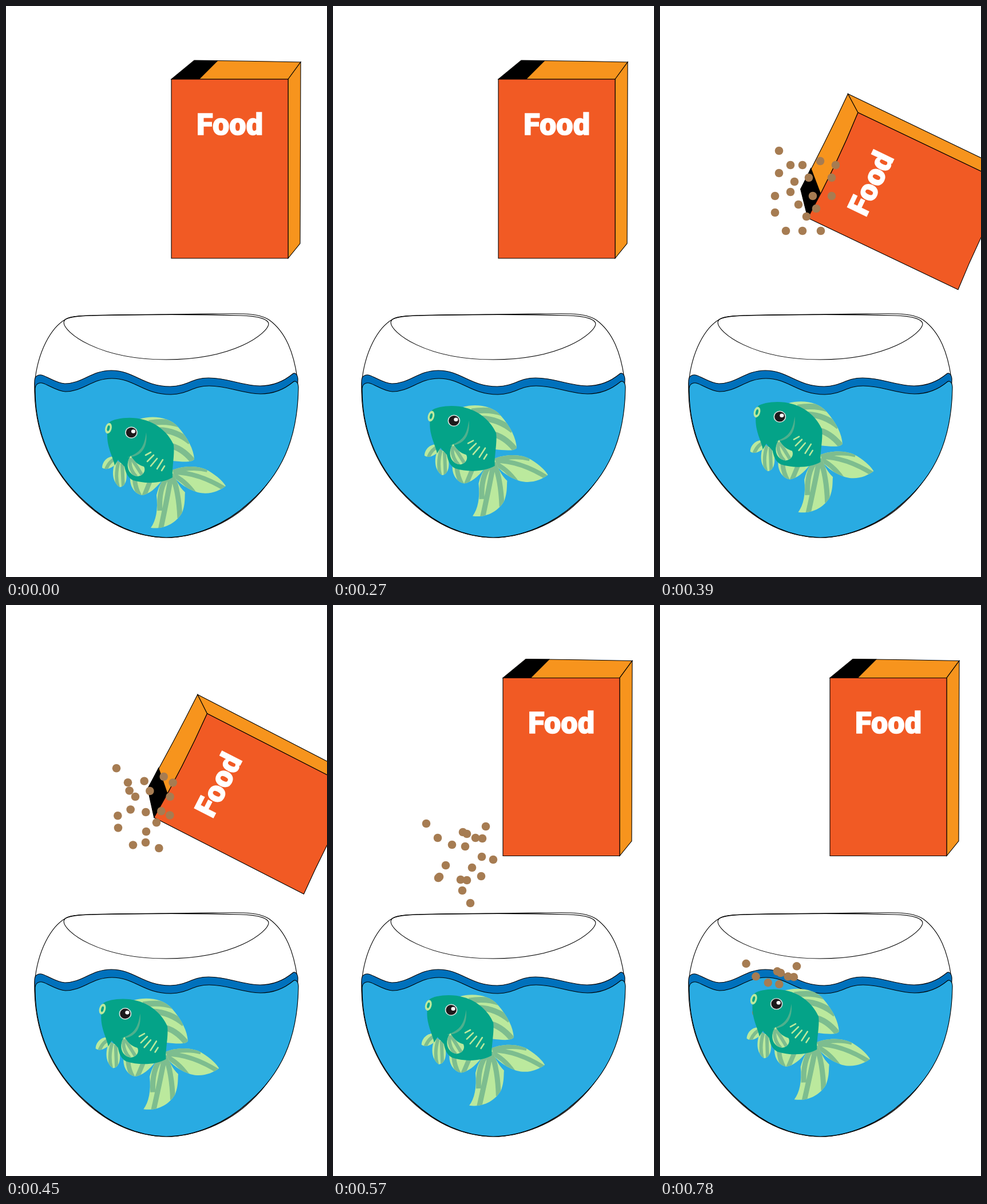
An HTML page with a canvas for the animation above (1530 ms loop, 561 px wide and 998 px high).

```html
<!DOCTYPE html>
<html lang="en">
<head>
<meta charset="utf-8">
<title>Feeding the fish</title>
<style>
html, body { margin: 0; width: 100%; height: 100%; overflow: hidden; background: #fff; }
canvas { display: block; }
</style>
</head>
<body>
<canvas id="stage" width="561" height="998"></canvas>
<script>
const ctx = document.getElementById('stage').getContext('2d');
const LOOP = 1530, STEP = 30, END = 780;
const LIGHT = '#bbe99d', STRIPE = '#7dbd8f', TEAL = '#04a388';

// time, x, y, angle, height scale, sag of the short edges
const boxKeys = [
  [270, 391, 284.5, 0, 1, 0],
  [390, 433.5, 341, -64.5, .93, 3],
  [420, 445, 362, -79, .95, 0],
  [510, 418, 318.5, -30.8, .917, 8],
  [570, 399, 283, 0, .994, 0]
];
// time, x, y, angle
const fishKeys = [
  [0, 0, 0, 0],
  [150, -6, -13.5, .3],
  [510, -12.5, -34, .8],
  [END, -16.5, -47.5, 1]
];
// x, y leaving the box, then x, y above the bowl
const flakes = [
  [208, 253, 163, 382], [228, 278, 183, 407], [249, 278, 227, 397], [280, 271, 267, 387],
  [307, 278, 261, 408], [208, 292, 231, 422], [260, 300, 234, 400], [300, 300, 260, 440],
  [235, 307, 208, 419], [228, 325, 197, 455], [201, 332, 184, 477], [267, 332, 280, 445],
  [300, 332, 259, 474], [242, 347, 249, 407], [273, 354, 243, 459], [201, 361, 186, 475],
  [256, 368, 223, 480], [220, 393, 226, 499], [249, 393, 234, 481], [281, 393, 240, 521]
];

function poseAt(keys, t) {
  const i = keys.findIndex(k => k[0] >= t);
  if (i < 0) return keys[keys.length - 1].slice(1);
  if (i === 0) return keys[0].slice(1);
  const a = keys[i - 1], b = keys[i], p = (t - a[0]) / (b[0] - a[0]);
  return a.map((v, j) => v + (b[j] - v) * p).slice(1);
}

function shape(d, fill, line) {
  const path = new Path2D(d);
  if (fill) { ctx.fillStyle = fill; ctx.fill(path); }
  if (line) { ctx.strokeStyle = line; ctx.stroke(path); }
}

function oval(x, y, rx, ry, fill, angle = 0) {
  ctx.beginPath();
  ctx.ellipse(x, y, rx, ry, angle, 0, 7);
  ctx.fillStyle = fill;
  ctx.fill();
}

// A light fin with darker rays kept inside its edge
function fin(d, rays, width) {
  shape(d, LIGHT);
  ctx.save();
  ctx.clip(new Path2D(d));
  ctx.lineWidth = width;
  shape(rays, null, STRIPE);
  ctx.restore();
}

function label(text, x, y, width) {
  const face = size => `900 condensed ${size}px Impact, Roboto, "Open Sans", sans-serif`;
  ctx.font = face(100);
  ctx.font = face(Math.min(66, 100 * width / ctx.measureText(text).width));
  ctx.textAlign = 'center';
  const m = ctx.measureText(text);
  y += (m.actualBoundingBoxAscent - m.actualBoundingBoxDescent) / 2;
  ctx.fillStyle = ctx.strokeStyle = '#fff';
  ctx.lineWidth = 1.5;
  ctx.strokeText(text, x, y);
  ctx.fillText(text, x, y);
}

function drawBox(t) {
  const [x, y, angle, scale, sag] = poseAt(boxKeys, t);
  const h = 156.5 * scale;
  ctx.save();
  ctx.translate(x, y);
  ctx.rotate(angle * Math.PI / 180);
  ctx.lineWidth = 1.1;
  const top = `Q0 ${-h + 2 * sag}`;
  shape(`M-102 ${-h}L-62 ${-h - 33}Q30 ${-h - 32 + sag} 124 ${-h - 30}L102 ${-h}${top} -102 ${-h}Z`, '#f7941d', '#000');
  shape(`M102 ${-h}L124 ${-h - 30}L123 ${h - 26}L102 ${h}Z`, '#f7941d', '#000');
  shape(`M-102 ${-h}${top} 102 ${-h}V${h}Q0 ${h - 2 * sag} -102 ${h}Z`, '#f15a24', '#000');
  shape(`M-102 ${-h}L-62 ${-h - 33}H-20L-53 ${-h + sag / 2}Z`, '#000');
  label('Food', 0, -h + 78 * scale, 116);
  ctx.restore();
}

function drawBowl() {
  const water = `M51 672C50 660 58 658 63 659C75 662 88 673 104 674C135 674 150 651 185 651
    C225 651 240 679 288 679C320 678 325 664 355 664C390 664 410 677 445 678
    C470 678 490 667 502 657C507 653 512 660 511 670C509 760 480 820 425 868
    C385 905 330 929 280 929C225 928 180 905 140 868C80 815 51 745 51 672Z`;
  ctx.lineWidth = 1.1;
  shape(`M50 660C55 605 78 562 105 547C120 540 150 540 280 539C350 539 390 537 415 538
    C440 539 450 543 459 548C490 570 503 608 509 650C513 740 480 820 428 867
    C388 906 330 929 280 929C225 928 178 905 138 868C78 813 48 745 50 660Z`, '#fff', '#000');
  shape(`M101 553C101 545 115 541 150 541C240 539 340 539 410 541C440 542 459 547 459 556
    C457 572 400 618 280 618C160 618 101 570 101 553Z`, null, '#000');
  ctx.save();
  ctx.translate(-1, -14);
  shape(water, '#0071bc', '#000');
  ctx.restore();
  shape(water, '#29abe2', '#000');
}

function drawFlakes(t) {
  if (t < 390) return;
  for (const [x, y, x2, y2] of flakes) {
    const keys = [
      [390, x, y],
      [510, x + (x2 - x) * 2 / 3, (y + y2) / 2],
      [570, x2, y2],
      [END, .85 * x2 + 12, .9 * y2 + 283]
    ];
    oval(...poseAt(keys, t), 7.3, 7.3, '#a67c52');
  }
}

function drawFish(t) {
  const [x, y, angle] = poseAt(fishKeys, t);
  ctx.save();
  ctx.translate(270 + x, 810 + y);
  ctx.rotate(angle * Math.PI / 180);
  ctx.translate(-270, -810);
  // back, tail and belly fins
  fin('M233 722C255 715 285 718 300 735C318 755 328 775 329 792C325 798 310 797 290 795L285 760Z',
    'M250 729Q280 724 304 732M268 741Q297 742 322 762M285 768Q308 772 328 797', 10);
  fin('M289 812C310 802 340 803 355 813C370 822 380 832 384 839C372 848 355 855 335 850C320 845 305 838 289 818Z',
    'M290 814Q325 804 352 811M290 815Q335 814 386 846M290 819Q312 828 330 853', 8);
  fin('M290 809C275 823 267 838 263 855C266 880 262 900 253 912C275 915 297 905 308 885C314 870 312 855 313 850C302 840 295 825 290 809Z',
    'M288 815Q266 838 269 882M289 818Q284 850 270 916M290 818Q302 848 304 895', 9);
  fin('M217 824C216 840 225 853 238 855C250 853 262 843 272 830Z',
    'M225 828Q226 843 234 857M252 830L241 857', 8);
  // left side fins
  fin('M193 788C180 784 168 795 168 807C175 812 185 808 195 798Z', 'M192 791Q180 795 174 812', 6);
  fin('M192 794C184 812 185 832 199 841C211 839 214 822 207 802Z', 'M197 796Q190 820 196 842M203 800L205 842', 6);
  // body
  shape(`M180 728C190 720 220 717 240 723C265 729 285 748 293 767C295 785 290 805 291 824
    C275 834 245 836 222 829C212 824 209 814 207 805C203 800 199 798 196 793
    L190 803C188 790 176 772 177 748Z`, TEAL);
  shape('M245 745C248 770 238 788 212 789C235 781 242 770 245 745Z', '#4fb08d');
  fin('M218 786C208 800 212 820 230 822C240 821 245 812 241 805C235 803 226 800 218 786Z',
    'M217 790Q214 808 228 823M219 790L238 820', 6);
  // scales
  ctx.lineWidth = 2.6;
  ctx.lineCap = 'round';
  shape('M244 785l9 -5M247 796l11 -11M253 804l11 -13M264 809l10 -16M272 812l5 -8', null, LIGHT);
  // mouth and eye
  oval(179, 738, 5.6, 9.5, LIGHT, .25);
  oval(179, 738, 2.2, 5, TEAL, .25);
  oval(219, 745.5, 10.8, 10.2, '#d9e2de');
  oval(219, 745.5, 9.2, 8.8, '#1d191b');
  oval(222.5, 743.5, 3.6, 3.3, '#fff');
  ctx.restore();
}

function draw(now) {
  const t = Math.min(END, Math.floor(now % LOOP / STEP) * STEP);
  ctx.fillStyle = '#fff';
  ctx.fillRect(0, 0, 561, 998);
  drawBowl();
  drawBox(t);
  drawFlakes(t);
  drawFish(t);
}

let start;
function tick(now) {
  start ??= now;
  draw(now - start);
  requestAnimationFrame(tick);
}
draw(0);
requestAnimationFrame(tick);
</script>
</body>
</html>
```
